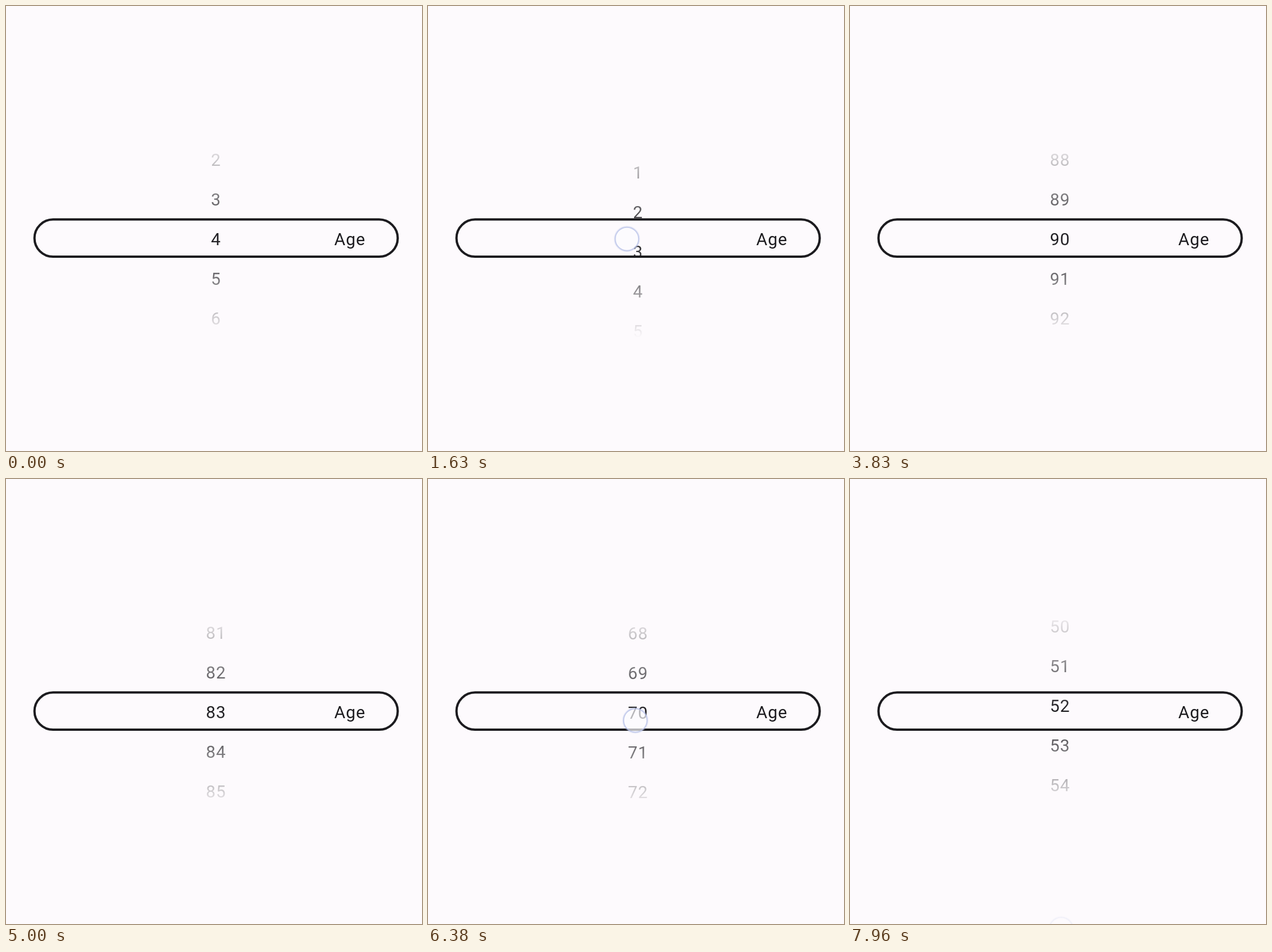
Animation of 723x774 px, one loop 8000 ms. Source, as an HTML page:

```html
<!DOCTYPE html>
<html lang="en">
<head>
<meta charset="utf-8">
<title>Age picker</title>
<style>
  html, body { margin: 0; width: 100%; height: 100%; overflow: hidden; background: #fdfafd; }
  svg { display: block; width: 100%; height: 100%; }
  text { font: 29.5px Roboto, sans-serif; letter-spacing: .95px; fill: #1c1b1f; }
  #wheel text { text-anchor: middle; }
</style>
</head>
<body>
<svg viewBox="0 0 723 774">
  <defs>
    <linearGradient id="fade" x1="0" y1="0" x2="0" y2="1">
      <stop offset="0" stop-color="#fff" stop-opacity="0"/>
      <stop offset=".5" stop-color="#fff"/>
      <stop offset="1" stop-color="#fff" stop-opacity="0"/>
    </linearGradient>
    <mask id="window" maskUnits="userSpaceOnUse" x="0" y="231" width="723" height="346">
      <rect x="0" y="231" width="723" height="346" fill="url(#fade)"/>
    </mask>
  </defs>
  <g id="wheel" mask="url(#window)"></g>
  <rect x="49.5" y="371.3" width="631.3" height="64.8" rx="32.4" fill="none" stroke="#1c1b1f" stroke-width="4"/>
  <text x="570.5" y="415.6">Age</text>
  <g id="touch" opacity="0">
    <circle r="20.5" fill="#fdfcff" fill-opacity=".68"/>
    <circle r="21" fill="none" stroke="#b9c2e8" stroke-width="3.6" stroke-opacity=".25"/>
    <circle r="20.5" fill="none" stroke="#b9c2e8" stroke-width="2" stroke-opacity=".75"/>
  </g>
</svg>
<script>
const LOOP = 8000, STEP = 69, BASE = 415.6, COUNT = 101;
const START = 4, SLOP = 15.5, FADE_IN = 40, FADE_OUT = 70;

// Each swipe drags the wheel down, then flings it to `to`.
const swipes = [
  [1420, 500, 344, 298, 724, -3, 400],
  [2690, 370, 360, 452, 752, -11, 620],
  [4010, 370, 360, 430, 752, -18, 500],
  [5170, 350, 360, 420, 752, -31, 800],
  [6332, 325, 360, 403, 752, -43, 800],
  [7550, 355, 360, 435, 783, -56, 1280]
].map(([at, drag, x, y0, y1, to, fling]) => ({ at, drag, x, y0, y1, to, fling }));

const clamp = p => Math.min(1, Math.max(0, p));
const easeIn = p => Math.pow(p, 1.6);
const easeOut = p => 1 - Math.pow(1 - p, 3);

const wheel = document.getElementById('wheel');
const touch = document.getElementById('touch');
const rows = Array.from({ length: 7 }, () => {
  const row = document.createElementNS('http://www.w3.org/2000/svg', 'text');
  row.setAttribute('x', 365);
  return wheel.appendChild(row);
});

function stateAt(t) {
  let value = START, finger = null;
  for (const s of swipes) {
    if (t < s.at) break;
    const age = t - s.at, after = age - s.drag;
    const pull = easeIn(clamp(age / s.drag));
    const y = s.y0 + (s.y1 - s.y0) * pull;
    const dragged = value - Math.max(0, y - s.y0 - SLOP) / STEP;
    value = dragged + (s.to - dragged) * easeOut(clamp(after / s.fling));
    finger = {
      x: s.x + 7 * pull, y,
      alpha: clamp(age / FADE_IN) * (1 - clamp(after / FADE_OUT))
    };
  }
  return { value, finger };
}

function render(t) {
  const { value, finger } = stateAt(t);
  const middle = Math.round(value);
  rows.forEach((row, i) => {
    const n = middle + i - 3;
    row.textContent = ((n % COUNT) + COUNT) % COUNT;
    row.setAttribute('y', (BASE + (n - value) * STEP).toFixed(2));
  });
  touch.setAttribute('opacity', finger ? finger.alpha : 0);
  if (finger) touch.setAttribute('transform', `translate(${finger.x} ${finger.y})`);
}

const begin = performance.now();
function tick() {
  render((performance.now() - begin) % LOOP);
  requestAnimationFrame(tick);
}
tick();
</script>
</body>
</html>
```
